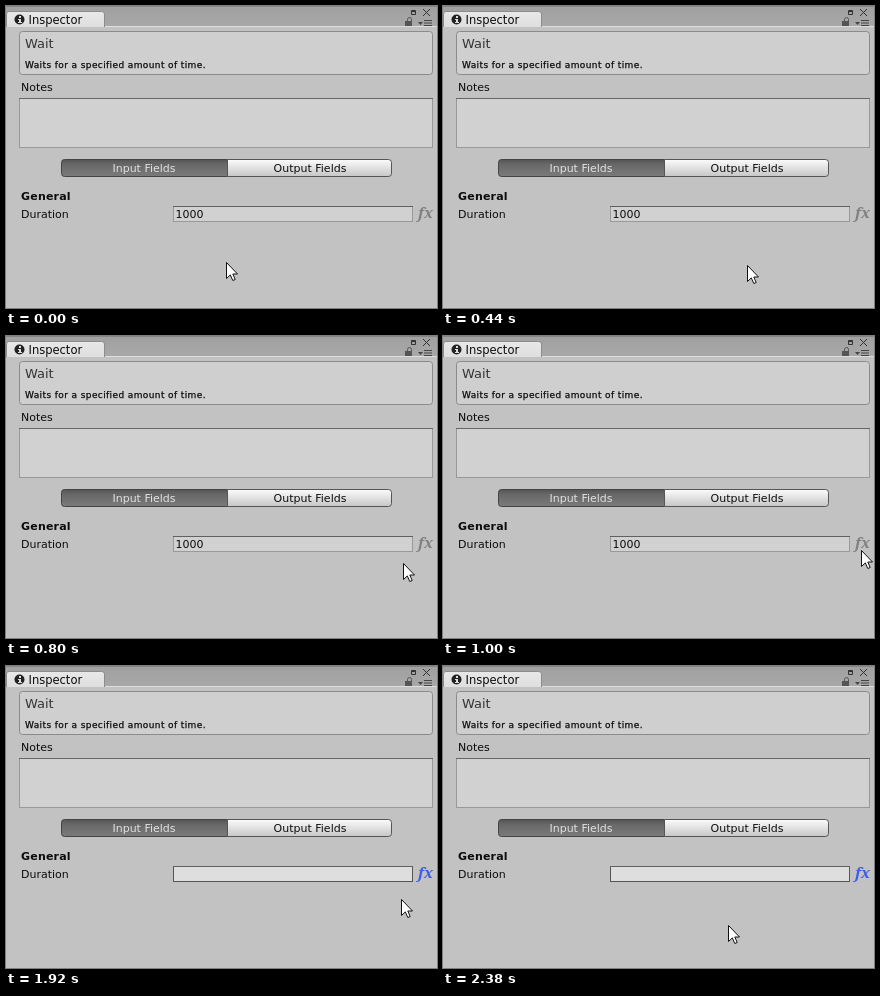
These frames come from a looping animation (431x302 px, 2.84 s). An HTML page:

```html
<!DOCTYPE html>
<html lang="en">
<head>
<meta charset="utf-8">
<title>Inspector</title>
<style>
  html, body { margin: 0; width: 100%; height: 100%; overflow: hidden; background: #c2c2c2; }
  svg { display: block; width: 431px; height: 302px; }
  text { font: 11px "DejaVu Sans", sans-serif; fill: #0c0c0c; }
  .tab { font-size: 11.5px; }
  .title { font-size: 13px; fill: #333; }
  .hint { font-size: 9px; letter-spacing: .39px; stroke: #0c0c0c; stroke-width: .25px; }
  .bold { font-weight: bold; letter-spacing: .2px; }
  .fx { font: italic bold 15px "Noto Serif", serif; }
  .mid { text-anchor: middle; }
</style>
</head>
<body>
<svg viewBox="0 0 431 302">
  <defs>
    <linearGradient id="bar" x2="0" y2="1">
      <stop stop-color="#a0a0a0"/><stop offset="1" stop-color="#a8a8a8"/>
    </linearGradient>
    <linearGradient id="active" x2="0" y2="1">
      <stop stop-color="#e8e8e8"/><stop offset="1" stop-color="#dedede"/>
    </linearGradient>
    <linearGradient id="pressed" x2="0" y2="1">
      <stop stop-color="#555"/><stop offset=".3" stop-color="#686868"/><stop offset="1" stop-color="#7b7b7b"/>
    </linearGradient>
    <linearGradient id="raised" x2="0" y2="1">
      <stop stop-color="#fcfcfc"/><stop offset="1" stop-color="#c6c6c6"/>
    </linearGradient>
  </defs>

  <!-- Window header -->
  <rect width="431" height="302" fill="#c2c2c2"/>
  <rect width="431" height="20" fill="url(#bar)"/>
  <path d="M0 .5H431" stroke="#858585"/>
  <path d="M0 20.5H431" stroke="#dedede"/>
  <path d="M.5 21V8Q.5 5.5 3 5.5H95.5Q98.500 5.5 98.500 8V21" fill="url(#active)" stroke="#8c8c8c"/>
  <circle cx="13.5" cy="13.5" r="5" fill="#222"/>
  <path d="M13 10h2v2h-2zM12 13h3v3h1v1h-4v-1h1v-2h-1z" fill="#ddd"/>
  <text class="tab" x="22.5" y="18">Inspector</text>
  <path d="M405.5 4.5h4v4h-4zM405 5.5h5M417 3l7 7m0-7l-7 7" fill="none" stroke="#333"/>
  <path d="M399 15h7v5h-7z" fill="#555"/>
  <path d="M401.5 15v-1.5a2 2 0 0 1 4 0V15" fill="none" stroke="#555"/>
  <path d="M412 16h5l-2.5 3z" fill="#444"/>
  <path d="M418 14.5h8m-8 2.500h8m-8 2.500h8" stroke="#444"/>

  <!-- Panel -->
  <rect x="13.5" y="25.5" width="413" height="43" rx="3" fill="#cfcfcf" stroke="#8b8b8b"/>
  <text class="title" x="19" y="42">Wait</text>
  <text class="hint" x="19" y="62">Waits for a specified amount of time.</text>
  <text x="15" y="85">Notes</text>
  <rect x="13.5" y="92.5" width="413" height="49" fill="#d1d1d1" stroke="#999"/>
  <path d="M13 92.5H427" stroke="#666"/>

  <path d="M221.5 153.5H58.5Q55.5 153.5 55.5 156.5V167.5Q55.5 170.5 58.5 170.5H221.5z" fill="url(#pressed)" stroke="#444"/>
  <path d="M221.5 153.5H382.5Q385.5 153.5 385.5 156.5V167.5Q385.5 170.5 382.5 170.5H221.5z" fill="url(#raised)" stroke="#555"/>
  <text class="mid" x="138" y="166" style="fill:#e2e2e2">Input Fields</text>
  <text class="mid" x="304" y="166">Output Fields</text>

  <text class="bold" x="15" y="194">General</text>
  <text x="15" y="212">Duration</text>
  <rect id="field" x="167.5" y="200.5" width="239" height="15"/>
  <path d="M167 200.5H407" stroke="#606060"/>
  <text id="value" x="169.5" y="212">1000</text>
  <text id="fx" class="fx" x="412" y="212">fx</text>

  <path id="cursor" d="M.5 .5V16.5L4.3 12.9 6.8 18.5 9.2 17.5 6.8 12H11.5z" fill="#fff" stroke="#111"/>
</svg>
<script>
const LOOP = 2840, CLEAR_AT = 1540, LEAD = 40;

// Pointer moves: a curve from the last resting place over `via` to `to`, shown in discrete steps
const home = [220, 256];
const moves = [
  { start: 210, end: 720, steps: 12, via: [304, 274], to: [389, 232], ease: 1 },
  { start: 770, end: 1080, steps: 7, via: [405, 223], to: [420, 212], ease: 2 },
  { start: 1230, end: 1230, steps: 1, via: [420, 212], to: [420, 211], ease: 1 },
  { start: 1690, end: 2200, steps: 12, via: [408, 241], to: [304, 258], ease: .75 },
  { start: 2250, end: 2380, steps: 4, via: [294, 259], to: [285, 259], ease: 1 }];

const [field, value, fx, cursor] = ["field", "value", "fx", "cursor"].map(id => document.getElementById(id));

function pointerAt(time) {
  let from = home;
  for (const { start, end, steps, via, to, ease } of moves) {
    if (time < start) break;
    const elapsed = Math.min(1, (time - start + LEAD) / (end - start + LEAD));
    const s = 1 - (1 - Math.round(elapsed * steps) / steps) ** ease;
    from = from.map((a, i) => Math.round(a * (1 - s) ** 2 + 2 * via[i] * s * (1 - s) + to[i] * s * s));
  }
  return from;
}

function draw() {
  const time = performance.now() % LOOP;
  const cleared = time >= CLEAR_AT;
  cursor.setAttribute("transform", `translate(${pointerAt(time)})`);
  field.setAttribute("fill", cleared ? "#dedede" : "#d1d1d1");
  field.setAttribute("stroke", cleared ? "#555" : "#999");
  value.style.display = cleared ? "none" : "";
  fx.style.fill = cleared ? "#3a5ce8" : "#808080";
  requestAnimationFrame(draw);
}
draw();
</script>
</body>
</html>
```
